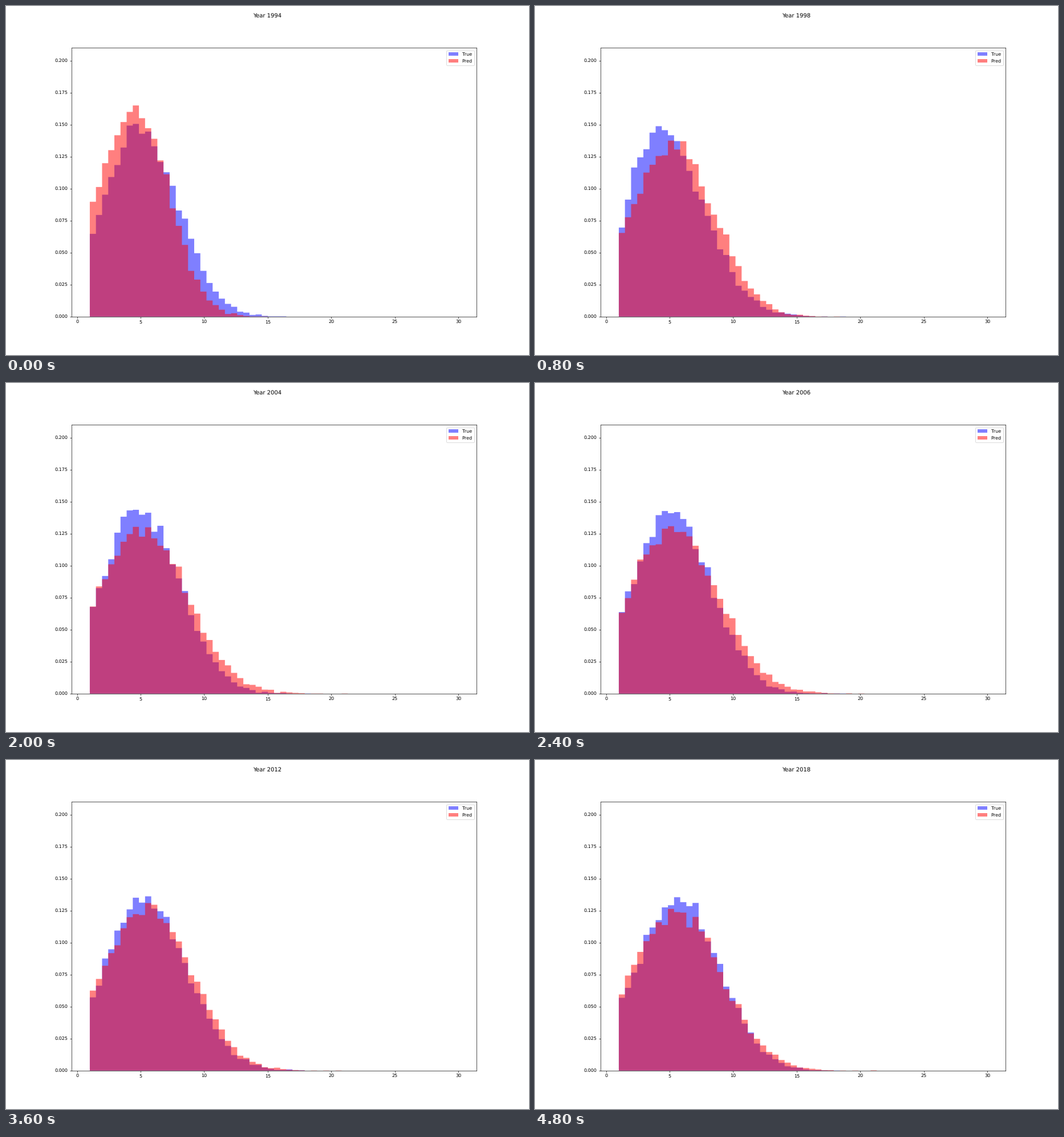
A matplotlib script for the animation above (5000 ms loop, 917 px wide and 611 px high).

```python
import numpy as np
import matplotlib.pyplot as plt
from matplotlib.animation import FuncAnimation

WIDTH, HEIGHT, DPI = 917, 611, 61.12
FIRST_YEAR, YEARS = 1994, 25
BINS = 60
EDGES = np.linspace(1, 30, BINS + 1)
CENTERS = (EDGES[:-1] + EDGES[1:]) / 2
GRAIN = 0.00012  # density added by a single sample

plt.rcParams["text.hinting"] = "none"
plt.rcParams["text.hinting_factor"] = 1


class Series:
    """A histogram drawn from a two-sided bell whose shape drifts over time."""

    key_years = [1994, 1996, 2000, 2004, 2008, 2012, 2018]

    def __init__(self, ax, label, color, seed, modes, spreads, left_ratio):
        self.seed, self.left_ratio = seed, left_ratio
        self.modes, self.spreads = modes, spreads
        self.patch = ax.stairs(np.zeros(BINS), EDGES, fill=True, color=color,
                               alpha=0.5, label=label, snap=False)

    def densities(self, year):
        mode = np.interp(year, self.key_years, self.modes)
        right = np.interp(year, self.key_years, self.spreads)
        spread = np.where(CENTERS < mode, self.left_ratio * mode, right)
        bell = np.exp(-((CENTERS - mode) / spread) ** 2 / 2)
        bell /= bell.sum() * (EDGES[1] - EDGES[0])
        rng = np.random.default_rng([self.seed, year])
        return GRAIN * rng.poisson(bell / GRAIN)

    def show(self, year):
        self.patch.set_data(self.densities(year))


# The small margin keeps the canvas size from rounding down
fig, ax = plt.subplots(
    figsize=((WIDTH + 0.01) / DPI, (HEIGHT + 0.01) / DPI), dpi=DPI)
title = fig.suptitle(f"Year {FIRST_YEAR}")

series = [
    Series(ax, "True", "blue", seed=1, left_ratio=0.57,
           modes=[4.9, 4.2, 3.9, 4.7, 5.1, 5.2, 5.6],
           spreads=[3.0, 3.4, 3.5, 3.25, 3.25, 3.4, 3.3]),
    Series(ax, "Pred", "red", seed=2, left_ratio=0.66,
           modes=[4.7, 5.8, 4.9, 5.0, 5.4, 5.7, 5.5],
           spreads=[2.6, 2.9, 3.5, 3.6, 3.5, 3.4, 3.6]),
]
ax.set_xlim(-0.45, 31.45)
ax.set_ylim(0, 0.21)
ax.legend(loc="upper right")


def update(frame):
    year = FIRST_YEAR + frame
    title.set_text(f"Year {year}")
    for item in series:
        item.show(year)


anim = FuncAnimation(fig, update, frames=YEARS, interval=200,
                     repeat=True, repeat_delay=0, blit=False)
plt.show()
```
